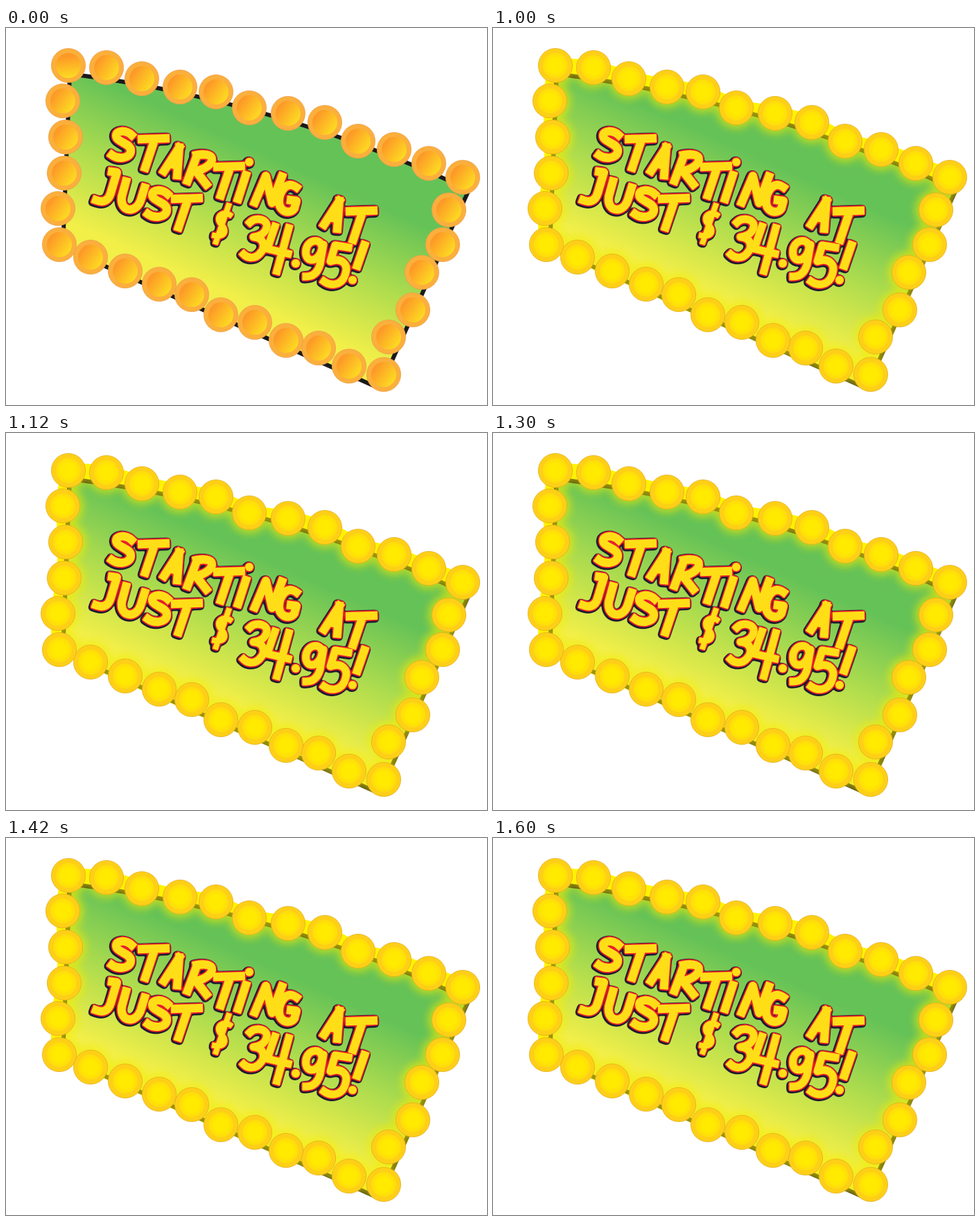
Animation of 694x543 px, one loop 1.8 s. Source, as an HTML page:

```html
<!DOCTYPE html>
<html lang="en">
<head>
<meta charset="utf-8">
<title>Flashing price sign</title>
<style>
  html, body { margin: 0; width: 100%; height: 100%; overflow: hidden; background: #fff; }
  svg { display: block; width: 694px; height: 543px; }
</style>
</head>
<body>
<svg viewBox="0 0 694 543" role="img" aria-label="Starting at just $ 34.95!">
  <defs>
    <linearGradient id="panelFill" gradientUnits="userSpaceOnUse" x1="370" y1="180" x2="285" y2="368">
      <stop offset="0" stop-color="#65c257"/>
      <stop offset=".5" stop-color="#addc4e"/>
      <stop offset="1" stop-color="#f2ef49"/>
    </linearGradient>
    <linearGradient id="coolGlass" x1=".08" y1=".2" x2=".92" y2=".8">
      <stop offset=".1" stop-color="#fd9a27"/>
      <stop offset="1" stop-color="#fddc22"/>
    </linearGradient>
    <linearGradient id="cornerGlass" x1=".45" y1="0" x2=".55" y2="1">
      <stop offset=".15" stop-color="#fd9a27"/>
      <stop offset="1" stop-color="#fddc22"/>
    </linearGradient>
    <radialGradient id="hotGlass">
      <stop offset=".55" stop-color="#ffea00"/>
      <stop offset="1" stop-color="#ffdb0c"/>
    </radialGradient>
    <filter id="soften" filterUnits="userSpaceOnUse" x="0" y="0" width="694" height="543">
      <feGaussianBlur stdDeviation="6"/>
    </filter>
    <!-- Grows the letters into a red rim and a rounded dark outline -->
    <filter id="outline" filterUnits="userSpaceOnUse" x="100" y="120" width="460" height="280" color-interpolation-filters="sRGB">
      <feGaussianBlur in="SourceAlpha" stdDeviation="1.5"/>
      <feComponentTransfer result="rim"><feFuncA type="linear" slope="8" intercept="-.5"/></feComponentTransfer>
      <feGaussianBlur in="SourceAlpha" stdDeviation="2.3"/>
      <feComponentTransfer><feFuncA type="linear" slope="16" intercept="-.5"/></feComponentTransfer>
      <feOffset dx="-.7" dy=".9" result="edge"/>
      <feFlood flood-color="#1c1830"/>
      <feComposite in2="edge" operator="in" result="dark"/>
      <feFlood flood-color="#e8202a"/>
      <feComposite in2="rim" operator="in" result="red"/>
      <feMerge>
        <feMergeNode in="dark"/><feMergeNode in="red"/><feMergeNode in="SourceGraphic"/>
      </feMerge>
    </filter>
    <path id="panel" d="M92 66Q390 104 668 233L539 519L82 316Z"/>
    <clipPath id="inside"><path d="M90 62Q391 100 672 231L541 523L78 319Z"/></clipPath>
  </defs>
  <path id="halo" fill="none" stroke="#fff200" stroke-width="22" stroke-linejoin="round"/>
  <use href="#panel" fill="url(#panelFill)" stroke="#1b191a" stroke-width="6"/>
  <g clip-path="url(#inside)"><g id="glow" fill="#f4ec00" opacity=".6" filter="url(#soften)"/></g>
  <g id="bulbs"/>
  <g id="lettering" fill="none" stroke="#ffde17" stroke-linejoin="round" filter="url(#outline)"/>
</svg>
<script>
const LOOP = 1800;
const $ = id => document.getElementById(id);

function add(parent, tag, attrs) {
  const node = document.createElementNS('http://www.w3.org/2000/svg', tag);
  for (const key in attrs) node.setAttribute(key, attrs[key]);
  return parent.appendChild(node);
}

// Bulb centres, clockwise from the top left corner
const centres = [
  [90, 54], [145, 57], [196, 73], [251, 85], [303, 92], [351, 115],
  [407, 123], [460, 136], [508, 163], [560, 175], [610, 195], [659, 215],
  [639, 262], [630, 312], [600, 352], [587, 406], [552, 445], [545, 499],
  [495, 487], [451, 461], [404, 450], [359, 424], [310, 413], [268, 384],
  [221, 369], [172, 350], [122, 330], [77, 312],
  [75, 260], [84, 209], [86, 157], [82, 105]
];
$('halo').setAttribute('d', 'M' + [...centres.slice(27), ...centres.slice(0, 13)].join('L'));

const bulbs = centres.map(([cx, cy], i) => {
  add($('glow'), 'circle', { cx, cy, r: 30 });
  return {
    rim: add($('bulbs'), 'circle', { cx, cy, r: 24.6, 'stroke-width': 0.8 }),
    glass: add($('bulbs'), 'circle', { cx, cy, r: 18 }),
    cool: i ? 'url(#coolGlass)' : 'url(#cornerGlass)'
  };
});

// Centre lines of the brush strokes; repeated letters share one shape
const glyphs = {
  S: 'M181 154C172 146 159 148 159 155C159 165 182 166 180 178C178 189 161 189 153 183',
  T: 'M196 160L230 159M214 162L201 201',
  A: 'M250 172L228 206M250 172L247 212M238 196L247 198',
  R: 'M275 185L262 220M275 183C306 177 303 200 274 206L289 225',
  I: 'M346 212L335 246',
  N: 'M359 251L375 213L384 252L398 214',
  G: 'M419 229C406 219 394 235 394 250C394 265 410 269 416 260L419 249L411 248',
  J: 'M153 207L160 208L151 238Q146 254 130 248',
  U: 'M173 221L167 243C164 266 189 268 195 246L200 230',
  $: 'M323 269C313 262 302 272 309 281C320 290 317 302 301 299M321 256L303 308',
  3: 'M352 280C361 271 379 276 376 287C374 297 363 301 357 301C374 302 374 317 367 324C360 333 349 332 343 326',
  4: 'M388 286L377 318L407 325M408 288L391 350',
  '.': 'M418 339h.01',
  9: 'M456 316C455 302 436 304 433 319C430 337 447 339 454 324L458 312L453 341Q448 358 433 358',
  5: 'M494 316L475 313L468 336C484 330 494 340 490 353C486 370 470 373 459 365',
  '!': 'M517 313L507 342'
};
const sign = [
  ['S'], ['T'], ['A'], ['R'], ['T', 109, 40], ['I'], ['.', -67, -146], ['N'], ['G'], ['A', 231, 77], ['T', 300, 104],
  ['J'], ['U'], ['S', 52, 85], ['T', 48, 86], ['$'], ['3'], ['4'], ['.'], ['9'], ['5'], ['!'], ['.', 82, 24]
];
const strokeWidth = char => char === '$' ? 8 : '3495'.includes(char) ? 11 : 12;

for (const [char, x = 0, y = 0] of sign) {
  add($('lettering'), 'path', {
    d: glyphs[char],
    'stroke-width': strokeWidth(char),
    'stroke-linecap': char === '.' ? 'round' : 'square',
    transform: `translate(${x} ${y})`
  });
}

const isLit = t => t >= 1000 && (t - 1000) % 300 < 200;

function draw(t) {
  const lit = isLit(t);
  const edge = lit ? '#e2ae20' : t < 1000 ? '#eda04a' : '#ad762c';
  $('halo').style.display = $('glow').style.display = lit ? '' : 'none';
  for (const { rim, glass, cool } of bulbs) {
    rim.setAttribute('fill', lit ? '#fecf17' : '#fbaf3c');
    rim.setAttribute('stroke', edge);
    glass.setAttribute('fill', lit ? 'url(#hotGlass)' : cool);
  }
}

const start = performance.now();
function tick() {
  draw((performance.now() - start) % LOOP);
  requestAnimationFrame(tick);
}
tick();
</script>
</body>
</html>
```
